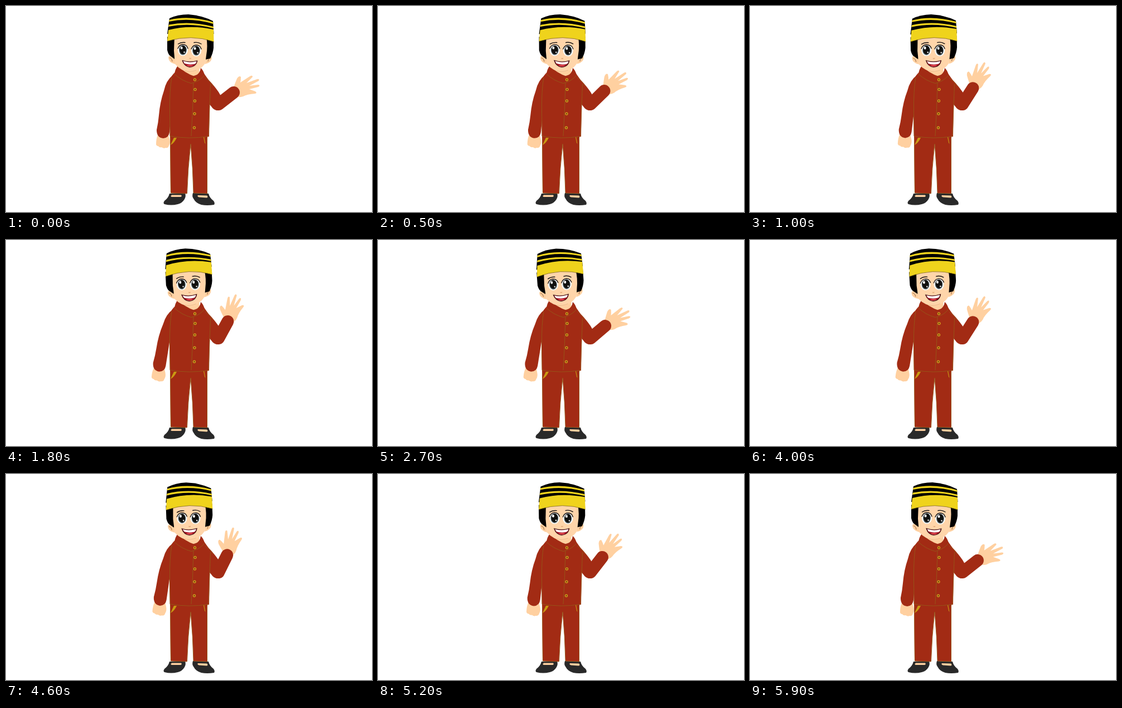
Write an HTML page that moves like this. It is 656 px wide and 369 px high and loops after 6000 ms.

```html
<!DOCTYPE html>
<html lang="en">
<head>
<meta charset="utf-8">
<title>Waving boy</title>
<style>
html, body { margin: 0; width: 100%; height: 100%; overflow: hidden; background: #fff; }
svg { display: block; width: 656px; height: 369px; }
.red { fill: #a22b14; }
.skin { fill: #ffd0a0; }
.gold { fill: #efd31c; }
.seam { fill: none; stroke: #96591a; stroke-width: .9; }
.ink { fill: none; stroke: #151010; stroke-width: 1.4; stroke-linecap: round; }
.sleeve { fill: none; stroke: #a22b14; stroke-width: 22; stroke-linecap: round; }
</style>
</head>
<body>
<svg viewBox="0 0 656 369">
  <defs>
    <g id="eye">
      <ellipse rx="9" ry="10.3" fill="#fff"/>
      <path class="ink" d="M-9-3Q-6-10 0-10Q7-10 9-3"/>
      <ellipse rx="6.9" ry="8.7" fill="#56666b"/>
      <ellipse cy="-.5" rx="5.8" ry="7.7" fill="#10100f"/>
      <ellipse cx="-2.4" cy="-4" rx="2" ry="2.5" fill="#fff"/>
      <circle cx="2.5" cy="3.8" r="1.2" fill="#fff"/>
    </g>
    <g id="button">
      <circle r="2.7" fill="#cf9a1d"/>
      <circle r="1.2" fill="#6f3a10"/>
    </g>
  </defs>

  <g id="shoes" fill="#292929">
    <path d="M293 336L321 335Q323 341 320 346Q316 353 308 355Q296 358 284 355Q281 353 284 349Q291 344 293 336Z"/>
    <path d="M335 335L363 336Q365 344 372 349Q375 353 373 356Q360 358 350 356Q340 353 336 345Q333 341 335 335Z"/>
    <path class="skin" d="M297 338.5L314 338.5Q316 341 313 342L297 342Q294 341 297 338.5ZM344 339L360 339.5Q363 342 360 343.5L346 342.5Q342 341 344 339Z"/>
  </g>

  <g id="trousers">
    <path class="red" d="M294 230L361 230L361 336L336 335Q335 290 331 247Q326 290 324.500 336L295 335Z"/>
    <path class="seam" d="M294.500 236L295.500 335L324 336M360.500 236L360.500 336L336 335M331 247Q326 290 324.500 336M331 247Q335 290 336 335"/>
    <path fill="#c99a12" d="M301 236L306 236Q302 245 295 249Q298 242 301 236ZM355 234L357.500 247L356 245L354 235Z"/>
  </g>

  <g id="lower">
    <path class="skin" d="M272 231Q269 238 269 248Q270 251 273 251Q275 254 279 253Q283 256 286 254Q291 255 292 250Q295 245 293 238L291 231Z"/>
    <path class="red" d="M299 124Q287 133 283 152Q276 172 274 196Q273 208 270 222Q270 236 282 237Q292 236 293 226L297 180L303 140Z"/>
  </g>

  <path class="red" d="M350 122Q364 130 381 154L390 170L382 187Q373 188 368 180L360 170Z"/>
  <g id="forearm">
    <g id="hand">
      <path class="skin" d="M403 149L409 143Q411 137 414 130Q418 124 421 127Q421 133 420 137L437 126Q442 123 442 127L431 138L450 131Q455 130 453 134L436 143L452 141Q457 142 452 145L436 149L447 153Q451 156 446 157Q432 158 425 162Q417 165 410 160Z"/>
    </g>
    <path class="sleeve" d="M381 176L408 155"/>
  </g>

  <g id="jacket">
    <path class="red" d="M304 118Q296 124 294 133L293 190L294 235Q330 239 364 234L365 178L367 138L355 121Z"/>
    <path class="seam" d="M297 128Q293 150 293.500 190L294 233Q328 239 363 233.500L365 180L366.500 140M357 128Q366 135 372 144M336 138Q335 185 332 233"/>
    <path class="skin" d="M311 104L347 104L346 122L328 128L312 118Z"/>
    <path class="red" d="M308 107Q303 113 302 122Q315 134 332 138.500Q347 135 356 124Q354 115 349 111Q348 121 338 126Q320 120 308 107Z"/>
    <path class="seam" d="M302 122Q315 134 332 138.500Q347 135 356 124"/>
    <g id="buttons"></g>
  </g>

  <g id="head">
    <path class="skin" d="M303 90Q293 86 291 92Q291 101 303 104ZM358 90Q367 86 369 92Q369 101 357 104Z"/>
    <path class="ink" stroke-width=".8" d="M293.500 93Q297 93 298 99M366.500 93Q363 93 362 99" style="stroke-width:.9;stroke:#8a5a38"/>
    <path d="M289 55L289 79Q291 87 294 89L302 95L306 58ZM355 58L357 96L366 94Q371 85 372 75L372 55Z"/>
    <path fill="#ffd5aa" d="M302 54L359 54Q362 72 359 88L357 103Q348 116 331 119Q314 117 303 104L301 80Z"/>
    <path fill="none" stroke="#e5b383" stroke-width=".8" d="M320 116Q331 119 341 115"/>
    <use href="#eye" x="317" y="79"/>
    <use href="#eye" x="341" y="80"/>
    <path class="ink" d="M308.500 68Q314 64.500 321 65.500M337 65.500Q344 64 350 68"/>
    <path fill="none" stroke="#d3965f" stroke-width="1" d="M328.500 93.500Q330 95 332 93.500"/>
    <path fill="#a30d1d" stroke="#351013" stroke-width="1" d="M316 97.500Q329 102 343 98Q341 109 329 109.500Q319 108 316 97.500Z"/>
    <path fill="#fff" d="M317.500 98.500Q329 102.500 341.500 99Q341 103 338 104Q329 106 320 103Z"/>
    <path fill="#e34952" d="M323 107Q329 104 336 107Q330 110 323 107Z"/>
    <path d="M293 22Q308 15 327 15Q352 17 371 27L372.500 50L289 50Z"/>
    <path class="gold" d="M292.500 25Q328 16 371.500 29L371.500 32Q330 20 292 28ZM292 33.500Q330 26 372 37L372 40Q330 29 291 37ZM291 43Q330 33 372 42L372.500 64Q332 50 289 63Z"/>
    <path fill="none" stroke="#6d5a10" stroke-width=".7" d="M289 63Q332 50 372.500 64"/>
  </g>
</svg>
<script>
const LOOP = 6000, STEP = 100;
const part = id => document.getElementById(id);

part('buttons').innerHTML = [[338.5, 132], [339, 149.5], [338.5, 170], [338, 193], [337.5, 218]]
  .map(([x, y]) => `<use href="#button" x="${x}" y="${y}"/>`).join('');

const smooth = (from, to, t) => {
  const k = Math.min(1, Math.max(0, (t - from) / (to - from)));
  return k * k * (3 - 2 * k);
};
// Eases out to a pose, holds it, and eases back by the end of the loop.
const sway = (arrive, leave, t) => smooth(0, arrive, t) - smooth(leave, LOOP, t);
const turn = (id, angle, x, y) =>
  part(id).setAttribute('transform', `rotate(${angle} ${x} ${y})`);

function draw(now) {
  const t = Math.floor(now % LOOP / STEP) * STEP;
  const wave = (1 - Math.cos(t / 3000 * 2 * Math.PI)) / 2;
  turn('head', -4.3 * sway(2800, 3250, t), 329, 120);
  turn('lower', 4.1 * sway(2000, 4000, t), 297, 130);
  turn('forearm', -26 * wave, 381, 176);
  turn('hand', -25 * wave, 409, 155);
}

let start;
function tick(now) {
  start ??= now;
  draw(now - start);
  requestAnimationFrame(tick);
}
draw(0);
requestAnimationFrame(tick);
</script>
</body>
</html>
```
